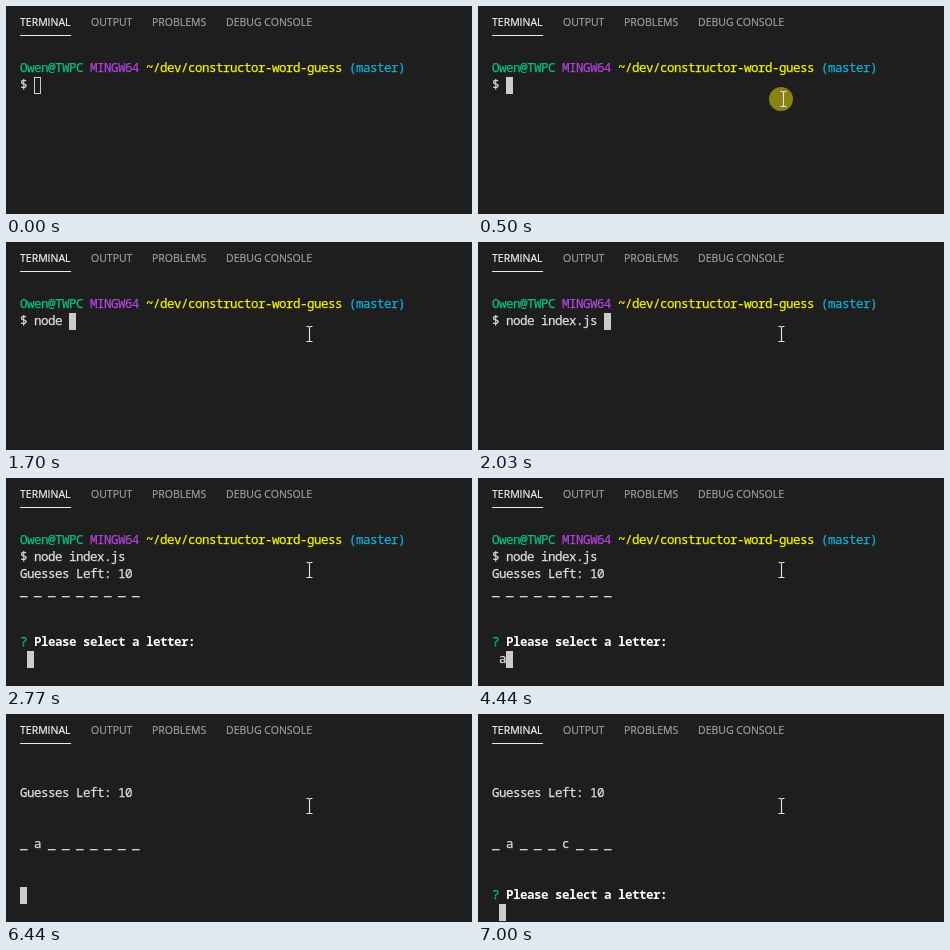
Recreate the animation shown at these times as an HTML page. Size 466x208 px, loop 8000 ms.

```html
<!DOCTYPE html>
<html lang="en">
<meta charset="utf-8">
<title>Terminal word game</title>
<style>
  html, body { margin: 0; width: 100%; height: 100%; overflow: hidden; background: #1e1e1e; }
  .tab { position: absolute; top: 9px; font: 10.5px/15px "Open Sans", sans-serif; color: #a0a0a0;
    white-space: pre; -webkit-text-stroke: .2px; }
  .on { color: #f4f4f4; }
  #line { position: absolute; left: 14px; top: 29px; width: 51px; height: 1px; background: #e7e7e7; }
  #text { position: absolute; left: 14px; top: 53px; margin: 0; color: #dedede;
    font: 12.5px/17px "Noto Sans Mono", monospace; letter-spacing: -.5px;
    font-variant-ligatures: none; -webkit-text-stroke: .25px; }
  #text b { color: #fff; -webkit-text-stroke: 0; }
  .g { color: #0dc07c; } .m { color: #b044d8; } .y { color: #f2f20c; } .c { color: #11aed4; }
  #cursor { position: absolute; width: 7px; height: 17px; box-sizing: border-box; border: 1px solid #ccc; }
  svg { position: absolute; left: 0; top: 0; }
</style>
<body>
<div class="tab on" style="left:14px">TERMINAL</div>
<div class="tab" style="left:85px">OUTPUT</div>
<div class="tab" style="left:146px">PROBLEMS</div>
<div class="tab" style="left:220px">DEBUG CONSOLE</div>
<div id="line"></div>
<pre id="text"></pre>
<div id="cursor"></div>
<svg width="466" height="208">
  <circle id="click" cx="303" cy="93" r="12" fill="#e8df08"/>
  <path id="mouse" d="M-3 -7.5H-1Q0 -7.5 0 -6.5Q0 -7.5 1 -7.5H3M0 -6.5V6.5M-3 7.5H-1Q0 7.5 0 6.5Q0 7.5 1 7.5H3"
    fill="none" stroke="#e4e4e4" stroke-width="1.1"/>
</svg>
<script>
const $ = id => document.getElementById(id);
const LOOP = 8000, STEP = 57.5;
const head = '<span class="g">Owen@TWPC</span> <span class="m">MINGW64</span> ' +
  '<span class="y">~/dev/constructor-word-guess</span> <span class="c">(master)</span>';
const ask = '<span class="g">?</span> <b>Please select a letter:</b>';
const left = 'Guesses Left: 10';
const keys = [1420, 1490, 1560, 1630, 1700, 1800, 1850];
const command = 'node index.js ';

// Returns the text rows and the cursor's column and row
function terminal(t) {
  if (t < 2770) {
    const n = t >= 2030 ? command.length : keys.filter(k => t >= k).length;
    return [[head, '$ ' + command.slice(0, n)], ...(t < 2360 ? [2 + n, 1] : [0, 2])];
  }
  if (t < 4670) {
    const rows = [head, '$ ' + command, left, '_ _ _ _ _ _ _ _ _', '', '', ask, t < 4440 ? '' : ' a'];
    return [rows, ...(t < 4440 ? [1, 7] : t < 4620 ? [2, 7] : [0, 8])];
  }
  const word = t < 7000 ? '_ a _ _ _ _ _ _ _' : '_ a _ _ _ c _ _ _';
  const rows = ['', left, '', '', word, '', ''];
  if (t >= 6440 && t < 6490) return [rows, 0, 7];
  const typed = t >= 6490 && t < 7000;
  rows.push(ask, typed ? ' c' : '');
  if (t >= 6950 && t < 7000) return [rows.slice(1), 0, 8];
  return [rows, typed ? 2 : 1, 8];
}

function pointer(t) {
  const s = Math.min(12, Math.floor((t - 120) / STEP));
  const rest = (1 - Math.min(1, s / 5)) ** 2;
  const x = (s < 8 ? 305 : 303) + 36 * rest;
  const y = (s < 8 ? 93 : 92) + 97 * rest;
  $('mouse').setAttribute('transform', `translate(${x + .5} ${y})`);
  $('mouse').style.opacity = s < 0 ? 0 : 1;
  $('click').style.opacity = s < 6 ? 0 : .52 * Math.min(1, (12 - s) / 5);
  $('cursor').style.background = s < 6 ? 'none' : '#ccc';
}

let shown;
function draw(now) {
  const t = now % LOOP;
  const [rows, col, row] = terminal(t);
  // A leading newline would be dropped by the parser, so one is always added
  const html = rows.join('\n');
  if (html !== shown) $('text').innerHTML = shown = html;
  $('cursor').style.left = 14 + 7 * col + 'px';
  $('cursor').style.top = 54 + 17 * row + 'px';
  pointer(t);
}

let start;
function tick(now) {
  start ??= now;
  draw(now - start);
  requestAnimationFrame(tick);
}
draw(0);
requestAnimationFrame(tick);
</script>
</body>
</html>
```
